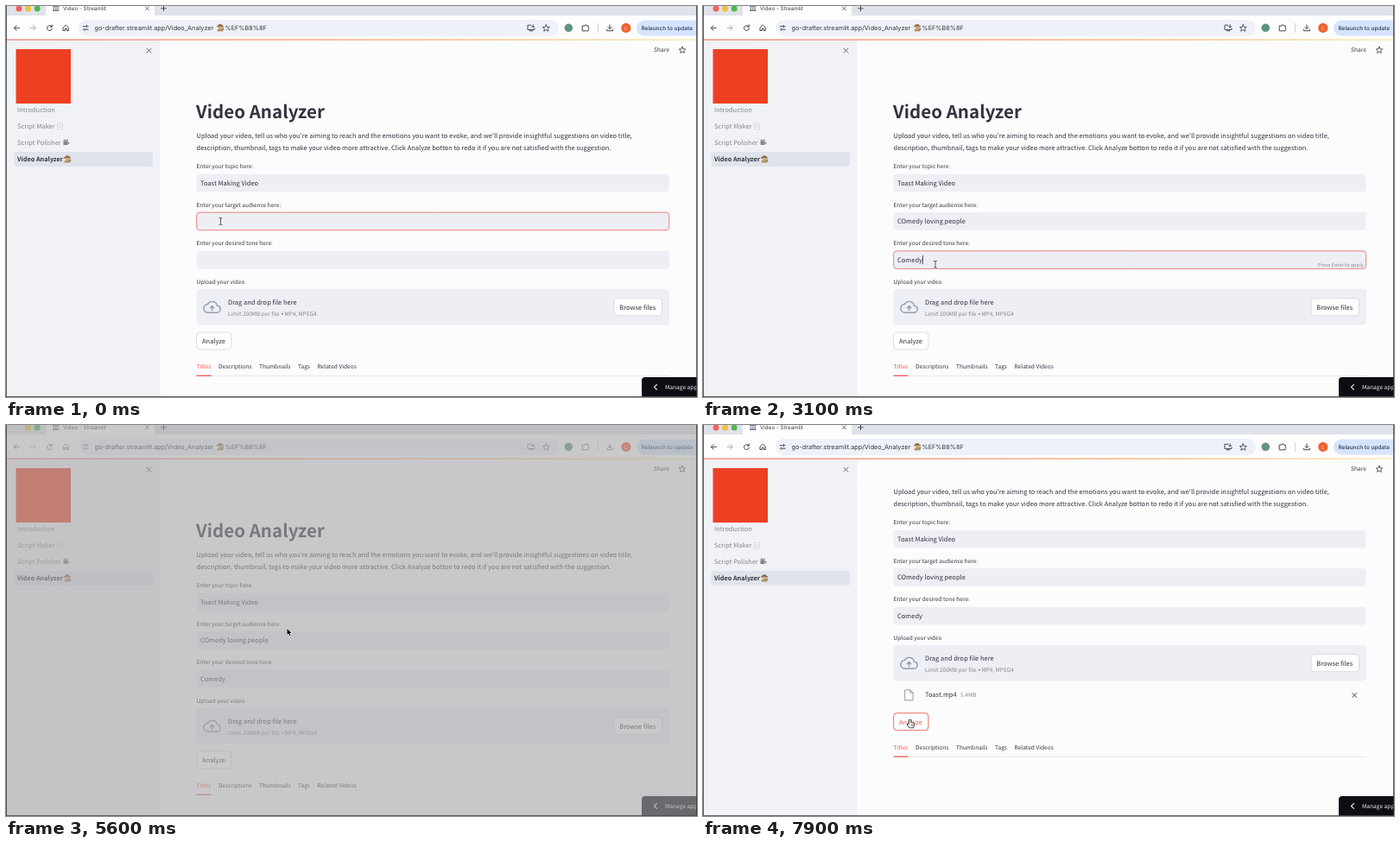
These frames come from a looping animation (800x453 px, 8 s). An HTML page with a canvas:

```html
<!DOCTYPE html>
<html lang="en">
<head>
<meta charset="utf-8">
<title>Video Analyzer</title>
<style>
  html, body { margin: 0; width: 100%; height: 100%; overflow: hidden; background: #fcfcfd; }
  canvas { display: block; width: 800px; height: 453px; }
</style>
</head>
<body>
<canvas id="stage"></canvas>
<script>
const LOOP = 8000;
const canvas = document.getElementById('stage');
const ctx = canvas.getContext('2d');
const dpr = window.devicePixelRatio || 1;
canvas.width = 800 * dpr;
canvas.height = 453 * dpr;

const SANS = '"Noto Sans CJK KR", "Noto Sans CJK JP", "Noto Sans CJK SC", "Noto Sans", sans-serif';
const UI = 'Inter, Roboto, sans-serif';
const INK = '#31333f', MUTED = '#83858e', RED = '#ee5a4c', FIELD = '#eeeff5', PAGE = '#fcfcfd';
const BODY = 7.5, SMALL = 6.55;
const AUDIENCE = 'COmedy loving people', TONE = 'Comedy';
const FILE_GAP = 28.8;

// ---- timing helpers ----
const clamp = v => Math.max(0, Math.min(1, v));
const between = (t, a, b) => t >= a && t < b;

function track(t, keys, ease = u => u * u * (3 - 2 * u)) {
  let prev = keys[0];
  for (const key of keys) {
    if (t < key[0]) {
      const u = ease(clamp((t - prev[0]) / (key[0] - prev[0])));
      return prev.slice(1).map((v, i) => v + (key[i + 1] - v) * u);
    }
    prev = key;
  }
  return prev.slice(1);
}

const typed = (text, t, start, end) =>
  text.slice(0, Math.floor(clamp((t - start) / (end - start)) * text.length));

const POINTER = [
  [0, 248.5, 249.5], [1450, 248.5, 249.5], [1750, 269, 299.5], [3100, 269, 299.5],
  [4200, 744.5, 339.5], [4600, 744.5, 339.5], [4800, 741.5, 344], [5250, 741.5, 344],
  [5550, 325.5, 236], [5700, 325.5, 236], [6400, 370, 371], [6600, 370, 371], [7500, 240.5, 346]
];
const SCROLL = [[6150, 0], [6450, 41.7], [6600, 41.7], [7150, 73]];
const DIM = [[5000, 0], [5600, 0.6], [5750, 0.6], [6200, 0]];

// ---- drawing helpers ----
function text(s, x, y, size, color = INK, weight = 400, family = SANS) {
  ctx.save();
  ctx.translate(x, y);
  ctx.scale(0.1, 0.1);
  ctx.font = `${weight} ${size * 10}px ${family}`;
  ctx.fillStyle = color;
  ctx.fillText(s, 0, 0);
  const width = ctx.measureText(s).width / 10;
  ctx.restore();
  return width;
}

function rect(x, y, w, h, fill) {
  ctx.fillStyle = fill;
  ctx.fillRect(x, y, w, h);
}

function box(x, y, w, h, r, fill, stroke) {
  ctx.beginPath();
  ctx.roundRect(x, y, w, h, r);
  if (fill) { ctx.fillStyle = fill; ctx.fill(); }
  if (stroke) { ctx.strokeStyle = stroke; ctx.lineWidth = 0.9; ctx.stroke(); }
}

function dot(x, y, r, fill) {
  ctx.beginPath();
  ctx.arc(x, y, r, 0, 7);
  ctx.fillStyle = fill;
  ctx.fill();
}

// SVG path placed at x, y
function path(d, x, y, color, width = 1, scale = 1, fill) {
  ctx.save();
  ctx.translate(x, y);
  ctx.scale(scale, scale);
  ctx.lineWidth = width;
  ctx.lineCap = ctx.lineJoin = 'round';
  const p = new Path2D(d);
  if (color) { ctx.strokeStyle = color; ctx.stroke(p); }
  if (fill) { ctx.fillStyle = fill; ctx.fill(p); }
  ctx.restore();
}

const STAR = 'M0 -4 L1.1 -1.3 4 -1.1 1.8 .8 2.5 3.6 0 2.1 -2.5 3.6 -1.8 .8 -4 -1.1 -1.1 -1.3Z';
const CROSS = 'M-2.5 -2.5 L2.5 2.5 M2.5 -2.5 L-2.5 2.5';
const CLOUD = 'M19.35 10.04A7.49 7.49 0 0 0 12 4C9.11 4 6.6 5.64 5.35 8.04A5.994 5.994 0 0 0 0 14c0 3.31 2.69 6 6 6h13c2.76 0 5-2.24 5-5 0-2.64-2.05-4.78-4.65-4.96z';
const ARROW = 'M0 0V8L1.9 6.3 3.1 9.2 4.4 8.6 3.2 5.8H5.8Z';

function sleuth(x, y) {
  rect(x, y - 2.5, 8, 1.6, '#9a7a4c');
  rect(x + 1.8, y - 4, 4.4, 2, '#7c5f3a');
  dot(x + 4, y, 2, '#d9a36c');
  rect(x + 0.8, y + 1.6, 6.5, 2.4, '#b98a52');
  dot(x + 7, y + 1.4, 1.4, '#6f9a86');
}

// ---- browser frame ----
function drawChrome(dim) {
  const icon = '#44474c';
  rect(0, 0, 800, 12, '#dfe2e8');
  box(46, -8, 126, 24, 5, '#fdfdfe');
  rect(0, 11, 800, 28, '#fdfdfe');
  ctx.globalAlpha = clamp(1 - 3 * dim);
  dot(15, 3, 3.5, '#f0625a');
  ctx.globalAlpha = 1;
  dot(25.6, 3, 3.5, '#f3bd3e');
  dot(36.2, 3, 3.5, '#4fb653');
  rect(54, -0.5, 7.5, 1.2, '#56606e');
  rect(54, 4.6, 7.5, 1.2, '#56606e');
  for (let i = 0; i < 3; i++) rect(54.8 + i * 2.4, 0, 1.2, 5, '#7d8794');
  text('Video - Streamlit', 66, 5, 6.3, '#3a3c40', 400, UI);
  path(CROSS, 163.5, 2.8, icon, 1, 0.8);
  path('M-2.8 0H2.8M0 -2.8V2.8', 182.5, 2.8, icon);

  box(84, 16, 556, 19, 9.5, '#eef1f7');
  text('go-drafter.streamlit.app/Video_Analyzer', 102.5, 28, 7.3, '#35373b', 400, UI);
  sleuth(244, 25.3);
  text('%EF%B8%8F', 253.5, 28, 7.3, '#35373b', 400, UI);

  ctx.globalAlpha = 1 - dim * 0.6;
  path('M3 0H-3M-.4 -2.8L-3.2 0 -.4 2.8', 12.5, 25.3, icon);
  path('M-3 0H3M.4 -2.8L3.2 0 .4 2.8', 31, 25.3, '#a9acb1');
  path('M2.4 -1.6A3 3 0 1 0 3 .8M2.8 -3.4V-1.2H.6', 50.5, 25.3, icon);
  path('M-3 -.4L0 -3.2 3 -.4V3.2H1V.8H-1V3.2H-3Z', 69.3, 25.3, icon);
  path('M-3 -1.8H0M2.6 -1.8H3M-3 1.8H-2.6M0 1.8H3M1.2 -3V-.6M-1.2 .6V3', 92.2, 25.4, icon);
  path('M-.2 -3H-4V2.2H4V.6M-1.8 3.6H1.8M2.2 -3.4V-.4M.8 -1.6L2.2 -.2 3.6 -1.6', 608, 25.2, icon);
  path(STAR, 625.3, 25.6, icon, 0.9);
  path('M-3.4 -2H-1A1.2 1.2 0 0 1 1.4 -2H3.2V.2A1.2 1.2 0 0 1 3.2 2.4V3.8H-3.4Z', 671, 25, icon);
  path('M0 -3.4V1M-2 -.8L0 1.2 2 -.8M-3.4 1.8V3.4H3.4V1.8', 699, 25.3, icon);
  ctx.globalAlpha = 1;
  dot(651.3, 25.3, 4.8, '#5f9484');
  rect(685, 20, 0.8, 11, '#c6cad2');
  dot(717.8, 25.4, 5.6, '#f0602c');
  text('C', 715.8, 27.5, 5.6, '#fbd3c2', 400, UI);

  box(730, 16.5, 80, 18, 9, '#d5e4fc');
  text('Relaunch to update', 735.5, 27.6, 6.45, '#20365c', 500, UI);

  const band = ctx.createLinearGradient(0, 0, 800, 0);
  band.addColorStop(0, '#f4877c');
  band.addColorStop(0.6, '#f7b07e');
  band.addColorStop(1, '#faeab0');
  rect(0, 38.4, 800, 1.4, band);
}

function drawSidebar() {
  rect(0, 39.8, 178.5, 414, '#f0f2f6');
  path(CROSS, 165.5, 51.7, '#55575f', 0.9);
  rect(11.5, 50, 63.5, 63, '#ed4023');
  const gray = '#85878d';
  text('Introduction', 13, 123.2, BODY, gray);
  text('Script Maker', 13, 142.2, BODY, gray);
  box(59.5, 136, 5.5, 7, 0.5, '#fafafa', '#cfd1d5');
  rect(60.8, 138, 3, 0.6, '#b9bcc2');
  rect(60.8, 140, 3, 0.6, '#b9bcc2');
  text('Script Polisher', 13, 161.2, BODY, gray);
  box(66.5, 156.6, 5, 4.4, 0.6, '#83868c');
  dot(67.8, 155.8, 1.4, '#999ca2');
  dot(70.6, 155.8, 1.4, '#999ca2');
  path('M0 0L2 -1.4V1.4Z', 71.2, 158.8, null, 1, 1, '#75787e');
  box(9.5, 169, 160.5, 17, 2, '#dfe4ec');
  text('Video Analyzer', 13, 180.2, 7.3, INK, 600);
  sleuth(67, 177.5);
}

// ---- form ----
function drawField(label, y, value, state) {
  text(label, 220.5, y, SMALL);
  const top = y + 6.4;
  box(220.7, top, 547, 20.6, 3.6, FIELD, state.focus ? '#e9766b' : null);
  const w = text(value, 225, top + 12.9, BODY);
  if (state.caret) rect(225 + (value ? w + 0.2 : 0), top + 5, 0.8, 10.5, INK);
  if (state.hint) text('Press Enter to apply', 712, top + 17.7, 5.7, MUTED);
}

function drawButton(label, x, y, w, textX, hot) {
  box(x, y, w, 20, 3.8, '#fefefe', hot ? RED : '#d8d9de');
  text(label, textX, y + 12.7, BODY, hot ? RED : INK);
}

function drawForm(t, scroll, px, py) {
  const hasFile = t >= 6150;
  const shift = hasFile ? FILE_GAP : 0;
  const inside = (x, y, w) => px > x && px < x + w && py > y - scroll && py < y - scroll + 20;
  const blink = since => (t - since) % 1000 < 500;

  ctx.save();
  ctx.beginPath();
  ctx.rect(179, 39.8, 621, 414);
  ctx.clip();
  ctx.translate(0, -scroll);

  text('Video Analyzer', 220, 129.7, 20.55, INK, 700);
  text("Upload your video, tell us who you're aiming to reach and the emotions you want to evoke, and we'll provide insightful suggestions on video title,", 220.5, 153.4, BODY);
  text('description, thumbnail, tags to make your video more attractive. Click Analyze botton to redo it if you are not satisfied with the suggestion.', 220.5, 166.9, BODY);

  const audience = typed(AUDIENCE, t, 350, 1450);
  const tone = typed(TONE, t, 2100, 3000);
  const first = t < 1700, second = between(t, 1700, 4700);
  drawField('Enter your topic here:', 188.3, 'Toast Making Video', {});
  drawField('Enter your target audience here:', 232.7, audience,
    { focus: first, caret: first && t > 250, hint: first && audience });
  drawField('Enter your desired tone here:', 277.4, tone,
    { focus: second, caret: second && (between(t, 2100, 3000) || blink(t < 3000 ? 1700 : 3000)), hint: second && tone });

  text('Upload your video', 220.5, 322, SMALL);
  box(220.5, 328, 547.5, 41.5, 3.8, FIELD);
  path(CLOUD, 229, 339.2, '#929bac', 1.8, 0.8);
  path('M0 3.2V-2M-2.2 .2L0 -2 2.2 .2', 238.6, 349.6, '#929bac', 1.4);
  text('Drag and drop file here', 257, 345.6, BODY);
  text('Limit 200MB per file', 257, 359, 6.48, MUTED);
  dot(319.9, 356.7, 1, MUTED);
  text('MP4, MPEG4', 322.4, 359, 6.48, MUTED);
  const held = between(t, 4700, 5300) || between(t, 6150, 6700);
  drawButton('Browse files', 704, 338.8, 55.5, 710.3, held || inside(704, 338.8, 55.5));

  if (hasFile) {
    path('M-4.5 -6H1.2L4.5 -2.8V6H-4.5ZM1.2 -6V-2.8H4.5', 238.6, 385.9, '#8d909b', 0.9);
    text('Toast.mp4', 257, 387.7, BODY);
    text('5.4MB', 298, 387.7, 6.45, MUTED);
    path(CROSS, 754.3, 386.1, INK, 0.9);
  }

  const ay = 378 + shift;
  drawButton('Analyze', 220.7, ay, 40.2, 227, inside(220.7, ay, 40.2));

  const ty = 419.9 + shift;
  text('Titles', 220.5, ty, 6.6, RED);
  [['Descriptions', 246], ['Thumbnails', 293], ['Tags', 338], ['Related Videos', 360.5]]
    .forEach(([s, x]) => text(s, x, ty, 6.6));
  rect(220.5, ty + 8.3, 547.5, 0.9, '#e4e5ea');
  rect(220.5, ty + 7.8, 17, 1.3, RED);
  ctx.restore();

  // fixed header and footer badge
  if (scroll > 0) rect(179, 39.8, 621, 31, PAGE);
  if (between(t, 1700, 1900)) {
    ctx.globalAlpha = 0.07;
    text('Running...', 676, 53.3, 6.5);
    text('Stop', 722, 53.3, 6.5);
    ctx.globalAlpha = 1;
  }
  text('Share', 750, 53.4, 6.6);
  path(STAR, 783, 51, INK, 0.8, 0.95);
  box(736, 430, 70, 30, [4, 0, 0, 0], '#0d0e14');
  path('M1.5 -2.8L-1.5 0 1.5 2.8', 752, 441.5, '#f2f2f4', 1.1);
  text('Manage app', 763, 444, 6.6, '#f2f2f4');
}

// ---- pointer ----
function drawPointer(t, x, y) {
  if (between(t, 350, 1450) || between(t, 2050, 3100)) return;
  if (t < 3200) {
    const beam = 'M-1.6 -4.2Q0 -4.2 0 -3.2Q0 -4.2 1.6 -4.2M0 -3.2V3.2M-1.6 4.2Q0 4.2 0 3.2Q0 4.2 1.6 4.2';
    path(beam, x, y, '#ffffff', 1.8);
    path(beam, x, y, '#2a2a2e', 0.8);
  } else if (t < 6250) {
    path(ARROW, x, y, '#ffffff', 1.1, 0.88, '#000');
  } else {
    path('M-1.8 1V-3.6A.8 .8 0 0 1 -.2 -3.6V-1.2L2.6 -.7Q3.6 -.4 3.5 .8L3 4.4H-1.4L-3.6 1.2Q-3.8 .2 -2.8 .2Z',
      x, y, '#1c1c1f', 1.6, 1, '#ffffff');
    path('M.8 .8V2.6M2 .8V2.6', x, y, '#1c1c1f', 0.5);
  }
}

function render(t) {
  const [px, py] = track(t, POINTER);
  const [scroll] = track(t, SCROLL);
  const [dim] = track(t, DIM, u => u);
  ctx.setTransform(dpr, 0, 0, dpr, 0, 0);
  ctx.textRendering = 'geometricPrecision';
  rect(0, 0, 800, 453, PAGE);
  drawForm(t, scroll, px, py);
  drawSidebar();
  drawChrome(dim);
  if (dim > 0) rect(0, 0, 800, 453, `rgba(167,167,168,${dim})`);
  rect(0, 0, 0.8, 453, '#3a3a3c');
  rect(799.2, 0, 0.8, 453, '#3a3a3c');
  rect(0, 452.2, 800, 0.8, '#4a4a4c');
  drawPointer(t, px, py);
}

function tick(now) {
  render(now % LOOP);
  requestAnimationFrame(tick);
}
render(0);
requestAnimationFrame(tick);
</script>
</body>
</html>
```
